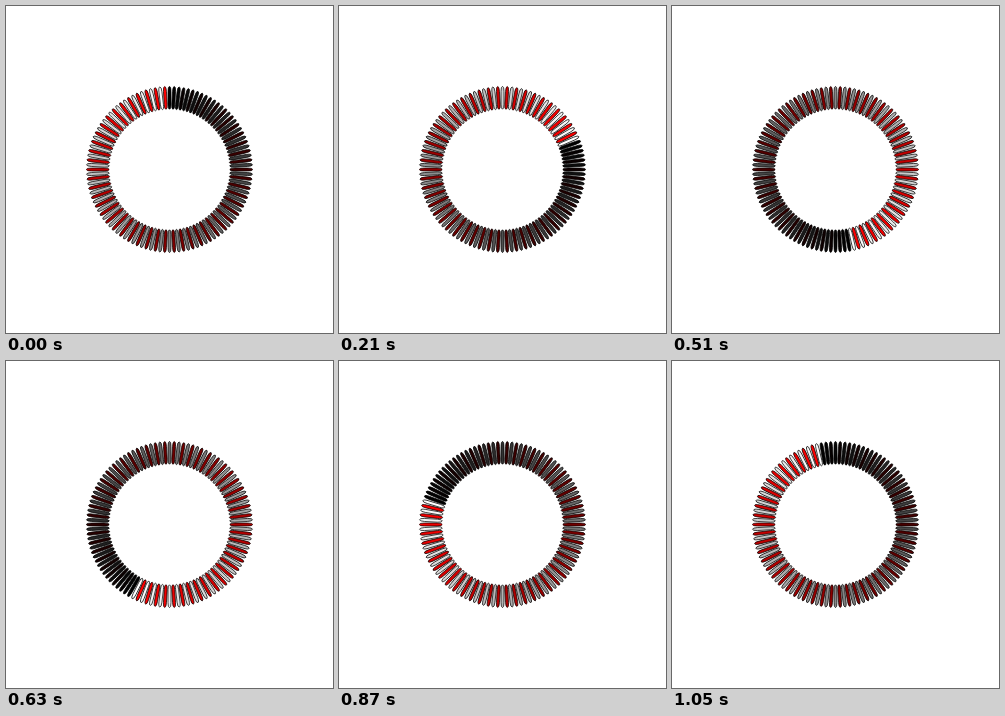
An HTML page with a canvas for the animation above (1080 ms loop, 327x327 px).

```html
<!DOCTYPE html>
<html lang="en">
<head>
<meta charset="utf-8">
<title>Ring spinner</title>
<style>
  html, body { margin: 0; width: 100%; height: 100%; overflow: hidden; background: #fff; }
  canvas { display: block; width: 327px; height: 327px; }
</style>
</head>
<body>
<canvas id="stage" width="327" height="327"></canvas>
<script>
  const ctx = document.getElementById("stage").getContext("2d");
  const STEP = 30, STEPS = 36, SPOKES = 108;
  const SHIFT = SPOKES / STEPS;
  const CENTER = 163.5, INNER = 60.3, OUTER = 83.1, WIDTH = 3;

  const spoke = new Path2D();
  spoke.roundRect(-WIDTH / 2, -OUTER, WIDTH, OUTER - INNER, { x: WIDTH / 2, y: 5 });

  function drawSpoke(index, color) {
    ctx.save();
    ctx.translate(CENTER, CENTER);
    ctx.rotate(index / SPOKES * Math.PI * 2);
    ctx.fillStyle = color;
    ctx.fill(spoke);
    ctx.stroke(spoke);
    ctx.restore();
  }

  function draw(step) {
    ctx.fillStyle = "#fff";
    ctx.fillRect(0, 0, 327, 327);
    ctx.strokeStyle = "#000";
    ctx.lineWidth = 0.7;
    for (let i = 0; i < SPOKES; i++) {
      // Brightness rises clockwise from the black head to the bright tail.
      const age = (i - step * SHIFT + SPOKES) % SPOKES;
      const v = Math.round(255 * age / (SPOKES - 1));
      drawSpoke(i, i % 2 ? `rgb(${v},0,0)` : `rgb(${v},${v},${v})`);
    }
  }

  const start = performance.now();
  let shown = 0;
  function tick() {
    const step = Math.floor((performance.now() - start) / STEP) % STEPS;
    if (step !== shown) draw(shown = step);
    requestAnimationFrame(tick);
  }
  draw(0);
  requestAnimationFrame(tick);
</script>
</body>
</html>
```
